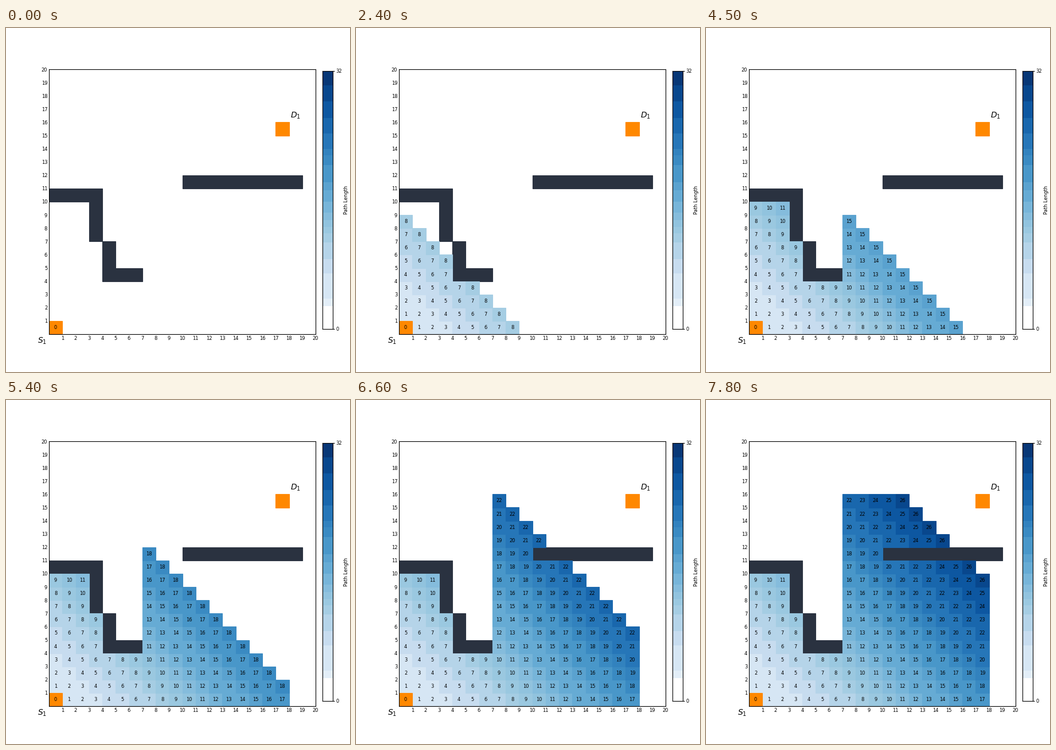
A matplotlib script for the animation above (8000 ms loop, 600x600 px).

```python
import matplotlib.pyplot as plt
from matplotlib.animation import FuncAnimation
from matplotlib.colors import BoundaryNorm, ListedColormap
from matplotlib.patches import Rectangle

plt.rcParams["font.family"] = "DejaVu Sans"
plt.rcParams["font.size"] = 6

SIZE = 20
MAX_LENGTH = 32
INTERVAL = 100
STEP_FRAMES = 3
START, GOAL = (0, 0), (17, 15)
ORANGE, WALL = "#ff8800", "#2a3240"

walls = {(x, 10) for x in range(4)} | {(3, y) for y in range(7, 10)}
walls |= {(4, y) for y in range(4, 7)} | {(x, 4) for x in (5, 6)}
walls |= {(x, 11) for x in range(10, 19)}

# Banded blues: the band edges are pixel rows of the colour bar.
BAND_ROWS = [525, 485, 472, 428, 403, 374, 358, 347, 335, 322, 303,
             283, 269, 239, 222, 211, 184, 157, 128, 100, 75]
edges = [(525 - row) / 450 * MAX_LENGTH for row in BAND_ROWS]
bands = [plt.cm.Blues((a + b) / 2 / MAX_LENGTH) for a, b in zip(edges, edges[1:])]
bands[0] = "white"
cmap = ListedColormap(bands)
norm = BoundaryNorm(edges, len(bands))


def reachable_cells():
    """Cells inside the start-goal box reached by steps right and up only."""
    found = set()
    for y in range(GOAL[1] + 1):
        for x in range(GOAL[0] + 1):
            linked = (x, y) == START or (x - 1, y) in found or (x, y - 1) in found
            if linked and (x, y) not in walls:
                found.add((x, y))
    return sorted(found - {START}, key=sum)


fig = plt.figure(figsize=(6, 6), dpi=100, facecolor="white")
ax = fig.add_axes([0.125, 0.11, 0.775, 0.77])
ax.set(xlim=(0, SIZE), ylim=(0, SIZE),
       xticks=range(1, SIZE + 1), yticks=range(1, SIZE + 1))
ax.tick_params(length=0, pad=2)


def add_cell(cell, color):
    return ax.add_patch(Rectangle(cell, 1, 1, fc=color, ec=color, lw=0.8))


def add_label(x, y, text, size=6):
    return ax.text(x, y, text, ha="center", va="center", fontsize=size)


for cell in sorted(walls):
    add_cell(cell, WALL)

wave = []
for cell in reachable_cells():
    length = sum(cell)
    patch = add_cell(cell, cmap(norm(length + 3)))
    label = add_label(cell[0] + 0.5, cell[1] + 0.5, str(length))
    wave.append((length, patch, label))

for cell in (START, GOAL):
    add_cell(cell, ORANGE)
add_label(0.5, 0.5, "0")
add_label(-0.5, -0.5, "$S_1$", 10)
add_label(18.5, 16.5, "$D_1$", 10)

bar = fig.add_axes([0.92, 0.125, 0.03, 0.75])
bar.set(xlim=(0, 1), ylim=(0, MAX_LENGTH), xticks=[], yticks=[0, MAX_LENGTH])
bar.yaxis.tick_right()
bar.tick_params(length=2, pad=2)
for low, high, color in zip(edges, edges[1:], bands):
    bar.add_patch(Rectangle((0, low), 1, high - low, fc=color, lw=0))
fig.text(594 / 600, 0.5, "Path Length", rotation=90, ha="center", va="center")


def update(frame):
    reach = frame // STEP_FRAMES
    for length, patch, label in wave:
        patch.set_visible(length <= reach)
        label.set_visible(length <= reach)
    return []


anim = FuncAnimation(fig, update, frames=8000 // INTERVAL, interval=INTERVAL,
                     repeat=True, repeat_delay=0)
plt.show()
```
